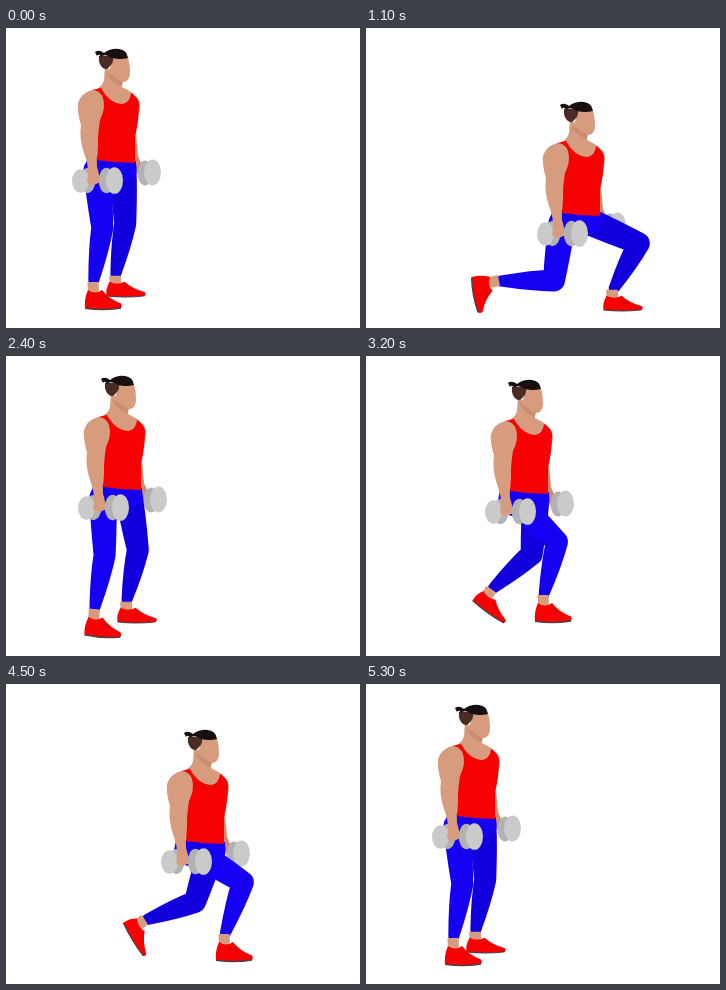
These frames come from a looping animation (354 by 300 pixels, 5.4 s). An HTML page:

```html
<!DOCTYPE html>
<html lang="en">
<head>
<meta charset="utf-8">
<title>Dumbbell lunge</title>
<style>
html, body { margin: 0; width: 100%; height: 100%; overflow: hidden; background: #fff; }
svg { display: block; width: 354px; height: 300px; }
.skin { fill: #d79b7d; }
.shade { fill: #c98d72; }
.red { fill: #f60202; }
.near { fill: #1600f2; }
.far { fill: #1200dc; }
.light { fill: #cacaca; }
.dark { fill: #b2b2b2; }
</style>
</head>
<body>
<svg viewBox="0 0 354 300">
  <defs>
    <g id="shoe">
      <path class="skin" d="M-5.5-3H5.5L6 9H-5Z"/>
      <path class="red" d="M-5 5Q-9 14-8 23Q10 26 27 23.5Q30 22 28 18.5Q16 14 9 5Q2 10-5 5Z"/>
      <path d="M-8 23.3Q10 26 28 23" fill="none" stroke="#4b4043" stroke-width="1.5"/>
      <path d="M8 13l4-2M11 15l4-2" stroke="#b80808" stroke-width="1"/>
    </g>
  </defs>

  <g class="upper">
    <path class="shade" d="M123 65Q134 68 134 78Q132 92 130 105L132 128Q136 137 139 144L133 148Q127 140 126 130L124 100Z"/>
    <ellipse class="dark" cx="139" cy="145" rx="7.5" ry="12.5"/>
    <ellipse class="light" cx="146.5" cy="144.5" rx="8.5" ry="13"/>
  </g>

  <path id="farLeg" class="far"/>
  <g id="farFoot"><use href="#shoe" transform="scale(1.07 .77)"/></g>
  <path id="nearLeg" class="near"/>
  <g id="nearFoot"><use href="#shoe"/></g>

  <g class="upper">
    <path class="near" d="M81 131L130 133L130 146Q118 158 104 158Q84 158 78 147Z"/>
    <path class="skin" d="M99 38L116 50L116 59Q124 63 128 66L122 80L100 80L86 63Q97 59 98 52Z"/>
    <path class="shade" d="M100 44L117 53L116 58Q105 55 100 44Z"/>
    <path class="red" d="M86 62L95 60Q103 75 116 76Q124 75 125 65Q131 68 133 75Q133 92 129 108L129 135Q110 135 91 132L92 105L88 82Z"/>
    <path class="skin" d="M105 29L122 29Q124 37 124 44Q124 53 118 54Q109 52 104 42Z"/>
    <path d="M93 28L107 28Q108 35 104 38Q101 43 97 40Q92 36 93 28Z" fill="#4b2c25"/>
    <path d="M89 24Q93 21 98 25Q105 20 113 21Q121 22 122 30Q114 32 106 30Q99 25 95 29Q93 25 91 28Z" fill="#17100f"/>

    <path d="M78 149H104V155H78Z" fill="#a8a8a8"/>
    <ellipse class="dark" cx="81.5" cy="152.5" rx="8" ry="12.5"/>
    <ellipse class="light" cx="74.5" cy="153" rx="8.5" ry="11.7"/>
    <path class="skin" d="M86 62Q75 65 72 75Q71 84 75 97Q73 110 78 125Q83 138 82 148Q80 154 83 156Q90 158 93 154Q94 147 91 139Q90 126 92 113Q92 105 94 92Q100 80 97 70Q94 62 86 62Z"/>
    <ellipse class="dark" cx="100.5" cy="152.5" rx="7.8" ry="12.8"/>
    <ellipse class="light" cx="108.5" cy="152.5" rx="8.5" ry="13.3"/>
  </g>
</svg>

<script>
const STEP = 100, COUNT = 54, HALF = 27;

// Depth of the lunge in steps, and the pose at each of those depths.
const KEYS = [0, 2, 3, 5, 7, 9, 11, 13];
const LUNGES = [
  { // far leg steps out
    length: 26,
    body: [[0, 6, 17, 48, 79, 97, 105, 106], [0, -1, -1, 3, 23, 42, 53, 55]],
    front: [[0, 11, 28, 75, 113, 134, 137, 137], [0, -2, -6, -8, 3, 13, 14, 14]]
  },
  { // near leg steps out
    length: 25,
    body: [[0, 6, 18, 53, 89, 104, 111, 112], [0, -1, -1, 3, 25, 41, 51, 53]],
    front: [[0, 12, 34, 90, 131, 152, 155, 155], [0, -3, -10, -15, -4, 6, 7, 7]]
  }
];
const REAR = [
  [0, 1, 5, 15, 28, 37, 43, 44],
  [0, -1, -6, -15, -13, -8, -4, -3],
  [0, 4, 14, 36, 59, 72, 80, 81]
];

const el = id => document.getElementById(id);
const upper = document.querySelectorAll('.upper');
const legs = {
  near: { hip: [91, 142], ankle: [87, 257], bone: 58, path: el('nearLeg'), foot: el('nearFoot') },
  far: { hip: [117, 140], ankle: [109, 250], bone: 55.5, path: el('farLeg'), foot: el('farFoot') }
};

function sample(row, k) {
  let i = 1;
  while (i < KEYS.length - 1 && KEYS[i] < k) i++;
  const f = (k - KEYS[i - 1]) / (KEYS[i] - KEYS[i - 1]);
  return row[i - 1] + (row[i] - row[i - 1]) * f;
}

// Tapered limb segment; mid is the half-width that shapes its sides.
function limb(a, b, ra, mid, rb) {
  const dx = b[0] - a[0], dy = b[1] - a[1], len = Math.hypot(dx, dy);
  const at = (f, r) => [a[0] + dx * f + dy / len * r, a[1] + dy * f - dx / len * r]
    .map(v => v.toFixed(2)).join(' ');
  return `M${at(0, ra)}Q${at(.42, mid)} ${at(1, rb)}A${rb} ${rb} 0 0 1 ${at(1, -rb)}` +
    `Q${at(.42, -mid)} ${at(0, -ra)}A${ra} ${ra} 0 0 1 ${at(0, ra)}Z`;
}

function findKnee(hip, ankle, bone) {
  const dx = ankle[0] - hip[0], dy = ankle[1] - hip[1], d = Math.hypot(dx, dy);
  const h = Math.sqrt(Math.max(0, bone * bone - d * d / 4));
  return [hip[0] + dx / 2 + dy / d * h, hip[1] + dy / 2 - dx / d * h];
}

function poseLeg(leg, body, [x, y, turn = 0], shift) {
  const hip = [leg.hip[0] + body[0] + shift, leg.hip[1] + body[1]];
  const ankle = [leg.ankle[0] + x, leg.ankle[1] + y];
  const knee = findKnee(hip, ankle, leg.bone);
  const hem = [ankle[0] + (knee[0] - ankle[0]) * .08, ankle[1] + (knee[1] - ankle[1]) * .08];
  leg.path.setAttribute('d', limb(hip, knee, 13.5, 13.5, 11) + limb(knee, hem, 11, 10.5, 5.5));
  leg.foot.setAttribute('transform', `translate(${ankle}) rotate(${turn})`);
}

function draw(time) {
  const n = Math.floor(time / STEP) % COUNT;
  const second = n >= HALF, m = n % HALF;
  const lunge = LUNGES[+second];
  const k = Math.max(0, Math.min(m, lunge.length - m));
  const pick = rows => rows.map(row => sample(row, k));
  const body = pick(lunge.body), front = pick(lunge.front), rear = pick(REAR);

  upper.forEach(g => g.setAttribute('transform', `translate(${body})`));
  poseLeg(legs.near, body, second ? front : rear, second ? Math.min(8, k * 8 / 7) : 0);
  poseLeg(legs.far, body, second ? rear : front, 0);
}

const start = performance.now();
function tick() {
  draw(performance.now() - start);
  requestAnimationFrame(tick);
}
tick();
</script>
</body>
</html>
```
